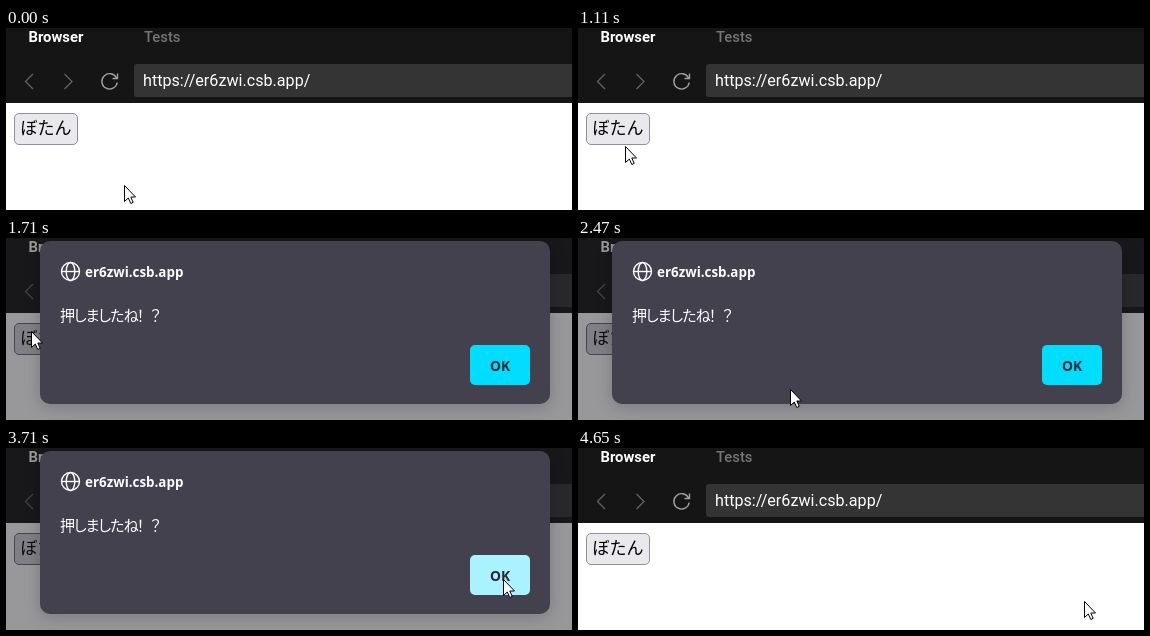
An HTML page for the animation above (4.72 s loop, 566 px wide and 182 px high).

```html
<!DOCTYPE html>
<html lang="ja">
<head>
<meta charset="utf-8">
<title>Button and alert</title>
<style>
  html, body { margin: 0; width: 100%; height: 100%; overflow: hidden; background: #fff; }
  svg { display: block; }
  .ui { font-family: Roboto, sans-serif; }
  .dialog { font-family: "Open Sans", "Noto Sans", sans-serif; font-weight: 700; }
  .ja { font-family: "Noto Sans CJK JP", "Noto Sans CJK", sans-serif; font-weight: 400; }
  .line { fill: none; }
  #modal { filter: drop-shadow(0 3px 8px rgba(0, 0, 0, .2)); }
</style>
</head>
<body>
<svg width="566" height="182" viewBox="0 0 566 182">
  <rect width="566" height="182" fill="#fff"/>
  <g class="ui">
    <rect width="566" height="75" fill="#151515"/>
    <text x="22.5" y="14" font-size="14.8" font-weight="700" fill="#fff">Browser</text>
    <text x="138" y="14" font-size="14.8" font-weight="500" fill="#757575">Tests</text>
    <path class="line" d="M27 46L19.5 53.5L27 61M58.5 46L66 53.5L58.5 61" stroke="#626262" stroke-width="1.3"/>
    <path class="line" d="M110.5 50A7.7 7.7 0 1 0 111.2 54.5M111.5 45.5V50.5H106.5" stroke="#a0a0a0" stroke-width="1.4"/>
    <path d="M566 36H131a3 3 0 0 0-3 3V66a3 3 0 0 0 3 3H566Z" fill="#343434"/>
    <text x="137" y="58" font-size="16.15" fill="#fff">https://er6zwi.csb.app/</text>
  </g>
  <rect id="button" x="8.5" y="85.5" width="63" height="31" rx="4.5"/>
  <text class="ja" x="40" y="105.5" font-size="17" text-anchor="middle">ぼたん</text>

  <g id="alert">
    <rect width="566" height="182" fill="#1c1b22" opacity=".45"/>
    <g id="modal" class="dialog" fill="#fbfbfe">
      <rect x="34" y="3" width="510" height="163" rx="10" fill="#42414d"/>
      <g class="line" stroke="#fbfbfe" stroke-width="1.4">
        <circle cx="64.5" cy="33.5" r="9"/>
        <ellipse cx="64.5" cy="33.5" rx="4.3" ry="9"/>
        <path d="M55.5 33.5H73.5"/>
      </g>
      <text x="79" y="39" font-size="13.4">er6zwi.csb.app</text>
      <g class="ja" font-size="15">
        <text x="54" y="83" style="font-feature-settings: 'palt'; letter-spacing: -1px">押しましたね</text>
        <text x="127" y="83">！？</text>
      </g>
      <rect id="ok" x="464" y="107" width="60" height="40" rx="5"/>
      <text x="494" y="133" font-size="13.8" text-anchor="middle" fill="#2b2a33">OK</text>
    </g>
  </g>

  <g id="cursor" fill="#fff" stroke="#000">
    <path id="arrow" d="M.5 .5V16.5L4.3 13L6.8 18.5L9.2 17.4L6.8 12H11.5Z"/>
    <path id="resize" d="M.5-11.5L4.5-7H2V7H4.5L.5 11.5L-3.5 7H-1V-7H-3.5Z"/>
  </g>
</svg>
<script>
const LOOP = 4720, STEP = 70;
const [button, alertBox, ok, cursor, arrow, resize] =
  ['button', 'alert', 'ok', 'cursor', 'arrow', 'resize'].map(id => document.getElementById(id));

const linear = p => p;
const smooth = p => p * p * (3 - 2 * p);

// Each move: start time, number of steps, end x, end y, easing
const moves = [
  [70, 2, 106, 146],
  [420, 7, 56, 125, smooth],
  [960, 3, 47, 118],
  [1180, 4, 25, 93],
  [1840, 1, 26, 95],
  [1980, 1, 27, 99],
  [2050, 7, 212, 151, smooth],
  [2730, 5, 360, 160],
  [3080, 3, 431, 150],
  [3290, 2, 466, 142],
  [3430, 5, 497, 131],
  [3840, 1, 499, 131],
  [4170, 4, 491, 133],
  [4650, 1, 506, 153],
];

function cursorAt(t) {
  let x = 118, y = 157;
  for (const [start, steps, endX, endY, ease = linear] of moves) {
    if (t < start) break;
    const p = ease(Math.min(1, (Math.floor((t - start) / STEP) + 1) / steps));
    x += (endX - x) * p;
    y += (endY - y) * p;
  }
  return [Math.round(x), Math.round(y)];
}

const between = (t, from, to) => t >= from && t < to;
const show = (node, visible) => node.setAttribute('visibility', visible ? 'visible' : 'hidden');

function paintButton(fill, stroke) {
  button.setAttribute('fill', fill);
  button.setAttribute('stroke', stroke);
}

function draw(t) {
  const resizing = between(t, 3840, 4170);
  cursor.setAttribute('transform', `translate(${cursorAt(t)})`);
  show(arrow, !resizing);
  show(resize, resizing);

  if (between(t, 1370, 1430)) paintButton('#b1b1b9', '#484851');
  else if (between(t, 1180, 3840)) paintButton('#d0d0d7', '#676774');
  else paintButton('#e9e9ed', '#8f8f9d');

  show(alertBox, between(t, 1510, 3840));
  alertBox.setAttribute('opacity', Math.min(1, (Math.floor((t - 1510) / 66) + 1) / 4));
  ok.setAttribute('fill', t >= 3710 ? '#aaf2ff' : t >= 3360 ? '#80ebff' : '#00ddff');
}

const begin = performance.now();
function tick() {
  draw((performance.now() - begin) % LOOP);
  requestAnimationFrame(tick);
}
tick();
</script>
</body>
</html>
```
